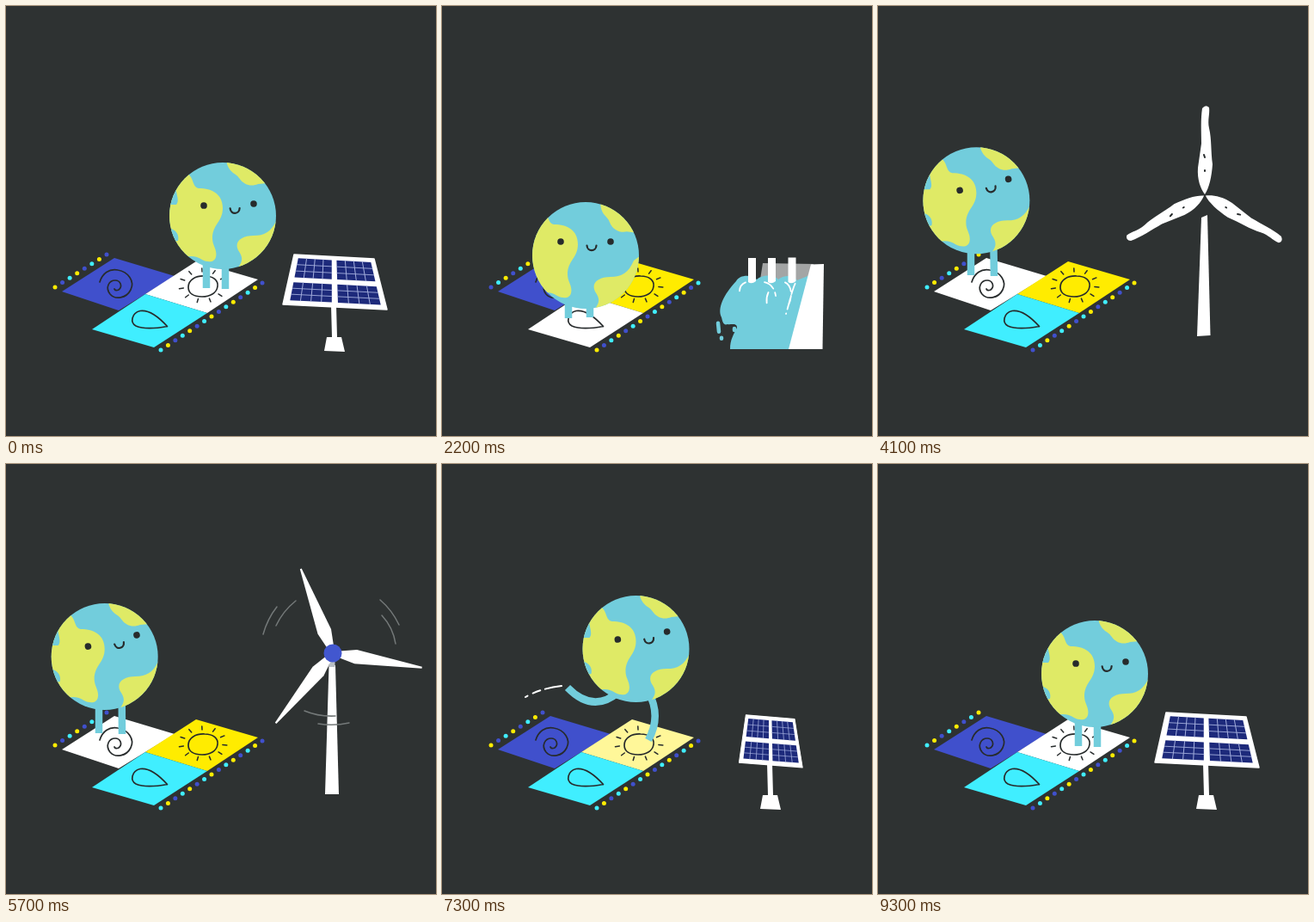
These frames come from a looping animation (500x500 px, 9.4 s). An HTML page with a canvas:

```html
<!DOCTYPE html>
<html lang="en">
<head>
<meta charset="utf-8">
<title>Earth on a dance mat</title>
<style>
  html, body { margin: 0; width: 100%; height: 100%; overflow: hidden; background: #2e3232; }
  canvas { display: block; width: 500px; height: 500px; }
</style>
</head>
<body>
<canvas id="stage" width="500" height="500"></canvas>
<script>
const c = document.getElementById('stage').getContext('2d');
const LOOP = 9400, STEP = 100;
const INK = '#272b2c', WHITE = '#fff', SEA = '#72cddc', LAND = '#dfea66';
const YELLOW = [255, 236, 0], BLUE = [64, 80, 204], CYAN = [64, 238, 255];

const clamp = v => Math.max(0, Math.min(1, v));
const ramp = (t, from, to) => clamp((t - from) / (to - from));
const mix = (a, b, k) => a + (b - a) * k;
const rgb = (a, white = 0) => `rgb(${a.map(v => Math.round(mix(v, 255, white)))})`;

// Value of a [time, value] track, linear between its keys.
function track(keys, t) {
  if (t <= keys[0][0]) return keys[0][1];
  for (let i = 1; i < keys.length; i++) {
    const [t1, b] = keys[i], [t0, a] = keys[i - 1];
    if (t <= t1) {
      const k = (t - t0) / (t1 - t0);
      return Array.isArray(a) ? a.map((v, j) => mix(v, b[j], k)) : mix(a, b, k);
    }
  }
  return keys[keys.length - 1][1];
}

function fill(path, color) {
  c.fillStyle = color;
  c.fill(path instanceof Path2D ? path : new Path2D(path));
}
function line(path, color, width, cap = 'round', dash = [], shift = 0) {
  c.strokeStyle = color;
  c.lineWidth = width;
  c.lineCap = cap;
  c.lineJoin = 'round';
  c.setLineDash(dash);
  c.lineDashOffset = shift;
  c.stroke(new Path2D(path));
  c.setLineDash([]);
}
function dot(x, y, r, color, ry = r) {
  c.beginPath();
  c.ellipse(x, y, r, ry, 0, 0, 7);
  c.fillStyle = color;
  c.fill();
}
function group(draw) { c.save(); draw(); c.restore(); }

/* ---- mat ---- */
const SPIRAL = 'M109 321C112 311 120 305 130 307C142 309 150 320 145 330C140 340 127 342 121 335C115 327 120 319 127 319C133 319 136 326 131 330C129 331 127 331 126 329';
const DROP = 'M187.5 372.5C178 362 166 353 156 354.5C146 357 144 368 151 372C160 376 174 375 187.5 372.5';

function dots(n, x0, y0, x1, y1, colors, shift) {
  for (let i = 0; i < n; i++) {
    const k = i / (n - 1);
    dot(mix(x0, x1, k), mix(y0, y1, k), 2.5, rgb(colors[(i + shift) % 3]));
  }
}
function mat(t) {
  const wind = ramp(t, 3850, 4050) - ramp(t, 6900, 7100);
  const sun = 1 - ramp(t, 700, 900) + ramp(t, 7180, 7380);
  const water = ramp(t, 980, 1180) - ramp(t, 3500, 3700);
  fill('M126 293L196 314L131 354L65 332Z', rgb(BLUE, wind));
  fill('M221 297L293 318L234 357L162 335Z', rgb(YELLOW, sun));
  fill('M162 335L234 357L172 397L100 376Z', rgb(CYAN, water));
  line(SPIRAL, INK, 1.7);
  line(DROP, INK, 1.7);
  line('M212 327C212 318 221 313.5 231 314C241 314 247 319 246 326C245 334 237 338 228 338C218 338 212 334 212 327Z', INK, 1.7);
  for (let i = 0; i < 11; i++) {
    const a = i * Math.PI * 2 / 11 + 0.1, x = Math.cos(a), y = Math.sin(a);
    line(`M${229 + x * 23} ${325 + y * 16}L${229 + x * 28} ${325 + y * 20}`, INK, 1.5);
  }
  // 93 chase steps fill the loop, so the three colours join up.
  const shift = Math.floor(t / LOOP * 93 + 0.75);
  dots(8, 57, 327, 117, 289, [YELLOW, BLUE, CYAN], shift);
  dots(15, 180, 400, 298, 322, [CYAN, YELLOW, BLUE], shift);
}

/* ---- earth ---- */
// x, y, face x, face y, face turn, map turn, left foot x y, right foot x y, leg bend
const ON_SUN = [252, 244, 7, -13, -2, 0, 233, 328, 255, 329, 0];
const ON_WATER = [167, 290, 0, -16, 0, 1, 147, 363, 172, 362, 0];
const ON_WIND = [114.7, 224, 9, -18.5, -13, 0, 108, 313, 135, 314, 0];
const moved = (pose, dx, dy, feet = 0) =>
  pose.map((v, i) => v + (i === 0 ? dx : i === 1 ? dy : i === 7 || i === 9 ? feet : 0));

const POSES = [
  [400, ON_SUN], [600, moved(ON_SUN, 0, 12)],
  [800, [222, 245, 4, -14, -2, 0.4, 200, 322, 232, 326, 8]],
  [1000, [178, 271, 0, -16, 0, 1, 150, 348, 178, 346, 3]],
  [1100, moved(ON_WATER, 0, -6)], [1200, moved(ON_WATER, 0, 6)], [1400, ON_WATER],
  [3100, ON_WATER],
  [3400, [166.5, 301, 2, -15, -2, 1, 148, 364, 184, 363, 0]],
  [3500, [166.5, 301, 2, -15, -2, 1, 148, 364, 184, 363, 0]],
  [3650, [143, 248, 6, -17, -8, 0.4, 128, 325, 158, 328, 6]],
  [3800, moved(ON_WIND, 0, -8, -8)], [3900, moved(ON_WIND, -1, 7)], [4200, ON_WIND],
  [6500, ON_WIND], [6800, moved(ON_WIND, 0, 14)],
  [7000, [145, 208, 9, -18, -13, 0, 116, 291, 162, 290, 8]],
  [7150, [185, 199, 8, -17, -11, 0, 124, 262, 210, 282, 18]],
  [7300, [225.5, 215, 7.5, -15.5, -9, 0, 146, 260, 240, 321, 28]],
  [7450, moved(ON_SUN, 0, 8)], [7600, ON_SUN]
];

const DISC = new Path2D();
DISC.arc(0, 0, 62, 0, 7);

function earth(t) {
  const [x, y, fx, fy, turn, map, lx, ly, rx, ry, bend] = track(POSES, t);
  const leg = (px, py, bx, by) => {
    const hx = x + Math.max(-20, Math.min(20, px - x)), hy = y + 50;
    line(`M${hx} ${hy}Q${(hx + px) / 2 + bx} ${(hy + py) / 2 + by} ${px} ${py}`, SEA, 8.5, 'butt');
  };
  leg(lx, ly, 0, bend);
  leg(rx, ry, bend * 0.55, 0);

  group(() => {
    c.translate(x, y);
    fill(DISC, SEA);
    group(() => {
      c.clip(DISC);
      group(() => {
        c.translate(-9 * map, -4 * map);
        fill('M-70 -60L-41 -49C-33 -44 -36 -34 -28 -32C-12 -32 0 -25 0 -9C0 7 -12 10 -12 26C-12 35 -6 39 -8 48C-10 55 -18 54 -24 51C-30 47 -36 46 -44 48L-70 50Z', LAND);
        fill('M-70 -13L-54 -13C-50 -18 -54 -24 -55 -36L-70 -30ZM-70 13C-56 14 -50 20 -52 29L-70 32Z', SEA);
      });
      group(() => {
        c.rotate(map * 0.21);
        fill('M4 -66L5 -60C9 -49 15 -50 19 -44C25 -35 34 -34 41 -37L52 -38L62 -50L40 -72Z', LAND);
      });
      c.translate(-7 * map, 2 * map);
      fill('M76 -6L63 4C57 18 49 23 36 23C22 23 13 30 18 40C22 46 25 51 18 60L24 70L76 70Z', LAND);
    });
    c.translate(fx, fy);
    c.rotate(turn * Math.PI / 180);
    const shut = [2500, 8500].some(b => t >= b && t < b + 200);
    for (const ex of [-29, 29]) dot(ex, 0, 3.8, INK, shut ? 0.9 : 3.8);
    line('M1.5 4.5C2 12 12 12 12.5 4.5', INK, 2.2);
  });

  if (t >= 7200 && t < 7450) line('M97 271Q114 261 139 258', WHITE, 2, 'round', [3, 7, 9, 6, 20, 9]);
}

/* ---- solar panel ---- */
const at = (u, v) => {
  const left = mix(335, 322, v), right = mix(428, 443, v);
  return `${mix(left, right, u)} ${mix(289, 347, v) + u * mix(5, 6, v)}`;
};
const quad = (u0, v0, u1, v1) => `M${at(u0, v0)}L${at(u1, v0)}L${at(u1, v1)}L${at(u0, v1)}Z`;

const PANEL_W = [[400, 1], [500, 1.08], [750, 0], [7150, 0], [7200, 0.3], [7300, 0.61],
  [7400, 1], [7500, 1.14], [7600, 0.97], [7700, 1]];

function panel(t) {
  const w = track(PANEL_W, t);
  if (w <= 0) return;
  group(() => {
    c.translate(0, 402 * (1 - Math.min(1, w * 2)));
    c.scale(1, Math.min(1, w * 2));
    fill('M378 348L384 348L385 385L390 385L394 402L370 401L373 385L379 385Z', WHITE);
    c.translate(382, 350);
    c.scale(w, mix(0.88, 1, w));
    c.translate(-382, -350);
    const frame = quad(0, 0, 1, 1);
    fill(frame, WHITE);
    line(frame, WHITE, 1.5);
    for (const [u0, u1] of [[0.06, 0.47], [0.53, 0.95]])
      for (const [v0, v1] of [[0.07, 0.45], [0.55, 0.91]]) {
        fill(quad(u0, v0, u1, v1), '#1d2a7b');
        for (let i = 1; i < 4; i++) {
          const u = mix(u0, u1, i / 4);
          line(`M${at(u, v0)}L${at(u, v1)}`, '#a3aedd', 1);
        }
        for (let i = 1; i < 3; i++) {
          const v = mix(v0, v1, i / 3);
          line(`M${at(u0, v)}L${at(u1, v)}`, '#a3aedd', 0.9);
        }
      }
  });
}

/* ---- dam ---- */
const FALLS = 'M342 320C346 312 360 312 366 318C372 312 386 312 391 318C398 312 409 313 413 319L430 312L404 399L335 399C335 388 339 382 343 374C343 368 335 371 332 370C327 372 326 366 325 362C320 352 327 336 342 320Z';
const SPURTS = 'M366 330C367 319 374 312 383 316C388 319 389 322 392 319C397 313 407 315 412 317C417 312 426 313 429 316L414 352C411 362 410 368 406 366C400 366 403 358 397 358C391 354 394 346 390 340C384 340 384 330 378 331C375 326 372 333 366 330Z';
const DRIPS = 'M369 331V337M375 346V349M380 357V362M379 336V341M391 349V364M391 372V377M398 366V374M396 386V387M405 360V370M409 377V379';
const FOAM = 'M354 321C348 323 346 327 346 332M374 321C382 322 387 329 388 337M380 332C377 338 377 342 378 348M398 321C406 324 409 336 402 350M411 322C407 330 404 345 400 358';

function pillar(x, top) {
  fill(`M${x} ${top}L${x + 9} ${top}L${x + 9} 320Q${x + 4} 324 ${x} 321Z`, WHITE);
}
function dam(t) {
  const h = track([[750, 0], [850, 0.5], [950, 1.03], [1050, 1], [3500, 1], [3600, 0.7], [3800, 0]], t);
  if (h <= 0) return;
  group(() => {
    c.translate(0, 399 * (1 - h));
    c.scale(1, h);
    if (t >= 1300) fill('M373 299L432 300L428 322L370 318Z', '#a3a5a5');
    if (t >= 1250) group(() => {
      const s = mix(0.6, 1, ramp(t, 1200, 1700));
      c.translate(428, 318);
      c.scale(s, mix(s, 1, 0.5));
      c.translate(-428, -318);
      fill(FALLS, SEA);
      const fall = (t % 600) / 600 * 4 - 2;
      line(`M321 ${368 + fall}L322 ${378 + fall}M340 375V377M325 ${385 + fall}v1`, SEA, 4.5);
      line(FOAM, WHITE, 1.8, 'round', [13, 5], -t / 40);
    });
    else if (t >= 1050) {
      fill(SPURTS, SEA);
      line(DRIPS, SEA, 5);
      line('M418 318Q424 316 427 321', WHITE, 1.6);
    }
    pillar(356, t < 1250 ? 305 : 293);
    pillar(379, 293);
    pillar(402.5, 292.5);
    fill('M429 300.5L444 300L442.5 399L403 399Z', WHITE);
  });
}

/* ---- wind turbine ---- */
const ROUGH = 'M0 -1C-5 -8 -9 -18 -8 -32L-4 -60C-4 -74 -5 -88 -3 -101Q1 -106 5 -102C6 -94 3 -88 5 -78C8 -66 7 -50 9 -36C8 -22 5 -8 0 -1Z';
const BLADE = 'M-4 -8L-8.5 -27L-1.5 -105L0.5 -105L8 -27L4 -8Z';
const GUSTS = 'M299 198Q304 180 315 166M314 188Q322 171 337 159M435 158Q449 170 457 187M437 176Q450 190 453 209M347 287Q364 294 383 293M363 302Q381 305 399 301';

function turbine(t) {
  if (t < 3750 || t >= 7200) return;
  const rough = t < 4350;
  const grow = ramp(t, 3700, 3900) * (1 - ramp(t, 6900, 7200));
  const spread = ramp(t, 3750, 4000) * (1 - ramp(t, 6900, 7200));
  const spin = 219.5 * Math.max(0, Math.min(t, 6900) - 4500) / 1200;

  group(() => {
    c.translate(0, 384 * (1 - grow));
    c.scale(1, grow);
    if (rough) fill('M376 246L383 243L386.5 383L371 384Z', WHITE);
    else {
      fill('M375.5 234L383 234L387 384L371 384Z', WHITE);
      fill('M376 227H382.5V236H376Z', '#b9bfc4');
    }
  });
  if (t >= 4700 && t < 6800) line(GUSTS, '#747979', 1.5);
  group(() => {
    c.translate(380, mix(384, 220, grow));
    c.scale(spread, spread);
    for (let i = 0; i < 3; i++) group(() => {
      c.rotate((spin + i * 120) * Math.PI / 180);
      if (rough) {
        fill(ROUGH, WHITE);
        line('M0 -28V-29M0 -44L-1 -47', INK, 2);
      } else fill(BLADE, WHITE);
    });
    if (!rough) dot(0, 0, 10.5, '#4257cf');
  });
}

function draw(t) {
  c.fillStyle = '#2e3232';
  c.fillRect(0, 0, 500, 500);
  mat(t);
  panel(t);
  dam(t);
  turbine(t);
  earth(t);
}

const start = performance.now();
function tick() {
  const t = (performance.now() - start) % LOOP;
  draw(Math.floor(t / STEP) * STEP);
  requestAnimationFrame(tick);
}
tick();
</script>
</body>
</html>
```
